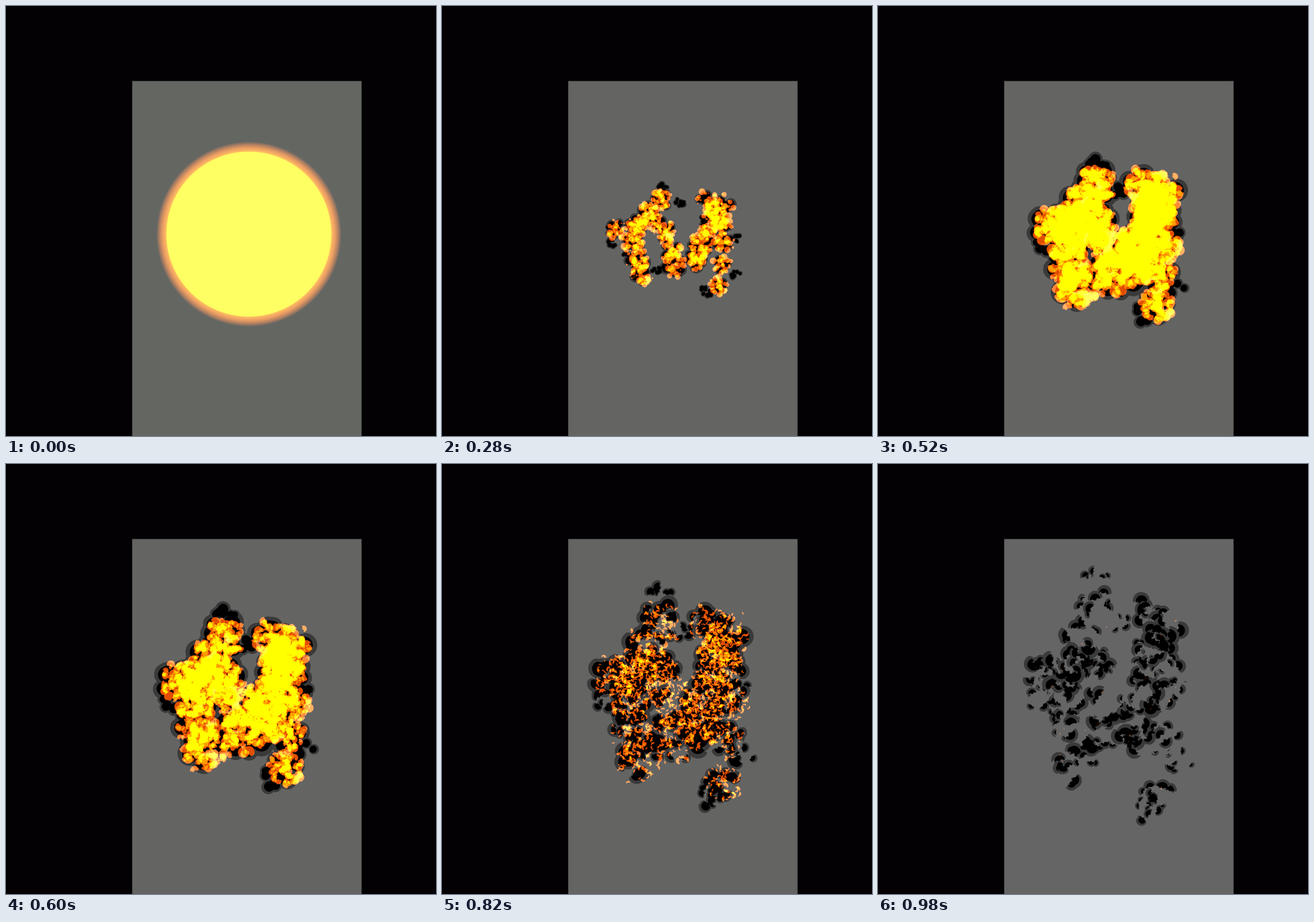
Animation, 748 px wide and 748 px high, one loop 1000 ms. Source, as an HTML page with a canvas:

```html
<!DOCTYPE html>
<html>
<head>
<meta charset="utf-8">
<style>
html, body { margin: 0; width: 100%; height: 100%; overflow: hidden; background: #030104; }
canvas { display: block; }
</style>
</head>
<body>
<canvas id="stage" width="748" height="748"></canvas>
<script>
const ctx = document.getElementById('stage').getContext('2d');
const LOOP = 1000, STEP = 20, BURST = 200, FLASH_END = 240, SPREAD = 440;
const CX = 415, CY = 400;

let seed = 11;
function rnd() {
  seed = seed + 0x6D2B79F5 | 0;
  let n = Math.imul(seed ^ seed >>> 15, 1 | seed);
  n = n + Math.imul(n ^ n >>> 7, 61 | n) ^ n;
  return ((n ^ n >>> 14) >>> 0) / 4294967296;
}
const clamp = v => Math.max(0, Math.min(1, v));
const mix = (a, b, k) => a + (b - a) * k;

// Each trail is a bent line of puffs: start, bend, end
const fireTrails = [
  [[380, 318], [325, 400], [345, 488]],
  [[300, 385], [388, 372], [402, 468]],
  [[462, 320], [497, 390], [484, 511]],
  [[492, 332], [458, 400], [442, 452]]
];
const smokeTrails = [
  [[384, 291], [428, 340], [518, 405]],
  [[290, 385], [294, 430], [372, 478]],
  [[455, 521], [478, 530], [513, 482]]
];

const fire = [], smoke = [];
function scatter(list, puff, count, power) {
  for (let i = 0; i < count; i++) {
    const far = Math.min(1, ((puff.y - CY) / 120) ** 2);
    list.push({ puff, a: rnd() * Math.PI * 2, d: rnd() ** power, size: mix(.75, 1.25, rnd()),
      turn: rnd() - .5, life: rnd(), base: rnd(), ph: rnd() * 9, speed: mix(rnd(), 1, far) });
  }
}
function puffs(trails, count, small, large, emit) {
  for (const [a, b, c] of trails)
    for (let i = 0; i < count; i++) {
      const k = i / (count - 1) * 2, [p, q, f] = k < 1 ? [a, b, k] : [b, c, k - 1];
      emit({ x: mix(p[0], q[0], f), y: mix(p[1], q[1], f), w: mix(small, large, rnd()) });
    }
}
puffs(fireTrails, 6, .72, 1, p => { scatter(smoke, p, 12, .5); scatter(fire, p, 64, .6); });
puffs(smokeTrails, 4, .4, .55, p => scatter(smoke, p, 7, .5));

// A disc that erodes to a small ragged chip as e goes from 0 to 1
function chip(x, y, r, angle, e, ph) {
  const k = 1 - 1.5 * e, s = r * Math.sqrt(1 - e);
  const c = Math.cos(angle), n = Math.sin(angle);
  ctx.setTransform(c, n, -n, c, x, y);
  ctx.beginPath();
  ctx.arc(0, 0, s, -Math.PI / 2, Math.PI / 2);
  for (let i = 1; i < 8; i++) {
    const u = Math.PI / 2 - i * Math.PI / 8;
    const rag = Math.sin(i * 2.3 + ph) * .25 * Math.min(1, e * 2);
    ctx.lineTo(s * (rag - k) * Math.cos(u), s * Math.sin(u));
  }
  ctx.fill();
}

function place(q, t, reach) {
  const { x, y, w } = q.puff, late = t - SPREAD;
  const r = w * 39 * (1 - Math.exp((BURST - t) / 85)) + .01 * (t - BURST);
  const push = late * (late < 0 ? 1 : q.speed), d = q.d * r * reach;
  return {
    x: CX + (x - CX) * (1 + .0002 * push) + Math.cos(q.a) * d,
    y: CY + (y - CY) * (1 + .0014 * push) - .03 * Math.max(0, late) + Math.sin(q.a) * d,
    r
  };
}

function drawSmoke(t, color, scale, reach, extra) {
  ctx.fillStyle = color;
  const spread = mix(.84, 1.02, clamp((t - 280) / 200));
  for (const q of smoke) {
    const start = 560 + 100 * q.life, end = 930 + 380 * q.life;
    const e = clamp((t - start) / (end - start)) + extra;
    if (e >= 1) continue;
    const p = place(q, t, reach * spread);
    chip(p.x, p.y, p.r * .45 * q.size * spread * scale, q.a + q.turn * 2, e, q.ph);
  }
}

function drawFire(t) {
  ctx.globalCompositeOperation = 'lighter';
  ctx.fillStyle = 'rgb(225,78,0)';
  for (const q of fire) {
    const start = 420 + 120 * q.life, end = 865 + 128 * q.life * q.life;
    const gone = clamp((t - start) / (end - start));
    const born = clamp((t - BURST - 140 * q.base) / 60);
    if (gone >= 1 || !born) continue;
    const p = place(q, t, .86);
    chip(p.x, p.y, p.r * .24 * q.size * born, q.a + q.turn * 5, mix(q.base * .4, 1, gone), q.ph);
  }
}

function drawFlash(t) {
  const k = t / 160, fade = clamp((FLASH_END - t) / 80);
  const inner = mix(142, 144, k), outer = mix(161, 169, k);
  const at = f => mix(inner, outer, f) / outer;
  const tone = (r, g) => `rgb(${r * fade},${g * fade},0)`;
  const g = ctx.createRadialGradient(0, 0, 0, 0, 0, outer);
  const core = tone(153, mix(190, 82, k)), soft = mix(.85, .45, clamp(k));
  g.addColorStop(0, core);
  g.addColorStop(at(0), core);
  g.addColorStop(at(.12), tone(155, mix(85, 62, clamp(k))));
  g.addColorStop(at(.45), tone(155 * soft, 62 * soft));
  g.addColorStop(at(.75), tone(85 * soft, 28 * soft));
  g.addColorStop(1, '#000');
  ctx.globalCompositeOperation = 'lighter';
  ctx.setTransform(1, 0, 0, mix(1, .896, k), 422.5, 396.8);
  ctx.fillStyle = g;
  ctx.beginPath();
  ctx.arc(0, 0, outer, 0, Math.PI * 2);
  ctx.fill();
}

function draw(t) {
  ctx.setTransform(1, 0, 0, 1, 0, 0);
  ctx.globalCompositeOperation = 'source-over';
  ctx.fillStyle = '#030104';
  ctx.fillRect(0, 0, 748, 748);
  ctx.fillStyle = t < FLASH_END ? '#646662' : t < 900 ? '#646462' : '#656565';
  ctx.fillRect(219.5, 130.5, 399, 618);
  if (t > BURST) {
    drawSmoke(t, '#3a3a3a', 1, .8, 0);
    drawSmoke(t, '#000', .75, .74, .06);
    drawFire(t);
  }
  if (t < FLASH_END) drawFlash(t);
}

const origin = performance.now();
function tick() {
  const t = (performance.now() - origin) % LOOP;
  draw(Math.floor(t / STEP) * STEP);
  requestAnimationFrame(tick);
}
tick();
</script>
</body>
</html>
```
